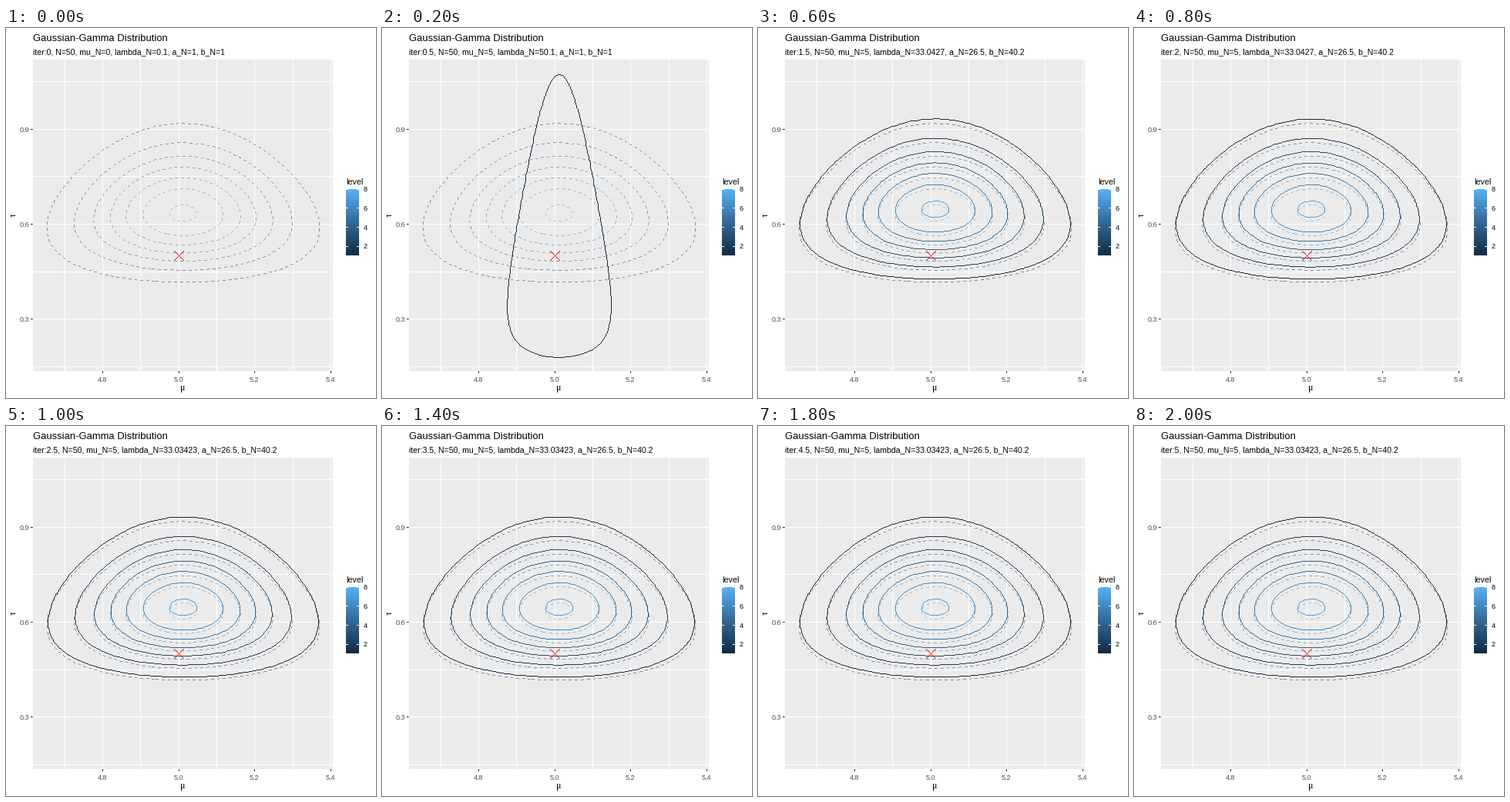
Animation of 480 by 480 pixels, one loop 2200 ms. Source, as a matplotlib script:

```python
import math
import numpy as np
import matplotlib.pyplot as plt
from matplotlib.animation import FuncAnimation

plt.rcParams["font.family"] = "Liberation Sans"
SIZE, DPI = 480, 100
PX = 72 / DPI
LEFT, TOP, RIGHT, BOTTOM = 35, 41, 424, 445
GREY, TICK = "#4D4D4D", (51, 51, 51)
WHITE, RED = (255, 255, 255), (255, 0, 0)
MIN_LEVEL, MAX_LEVEL = 1, 8

# model constants
N, LAMBDA0, A0, B0 = 50, 0.1, 1.0, 1.0
MU_N, A_N, B_BASE = 5.012, 26.5, 40.159863


def px_x(mu):
    return 224.1 + 493.5 * (mu - 5)


def px_y(tau):
    return 254.55 - 410.8 * (tau - 0.6)


def blue_scale(t):
    """Perceptual blend from dark to light blue, as 0-255 RGB."""
    to_xyz = np.array([[0.4124, 0.3576, 0.1805],
                       [0.2126, 0.7152, 0.0722],
                       [0.0193, 0.1192, 0.9505]])

    def encode(hex_color):
        c = np.array([int(hex_color[i:i + 2], 16) for i in (1, 3, 5)]) / 255
        return np.cbrt(to_xyz @ ((c + 0.055) / 1.055) ** 2.4)

    low, high = encode("#132B43"), encode("#56B1F7")
    rgb = np.linalg.solve(to_xyz, (low + (high - low) * t) ** 3)
    rgb = 1.055 * np.clip(rgb, 0, 1) ** (1 / 2.4) - 0.055
    return np.round(255 * np.clip(rgb, 0, 1))


def normal_gamma(mu, tau, m, lam, a, b):
    log_p = (0.5 * np.log(lam * tau / (2 * math.pi))
             - 0.5 * lam * tau * (mu - m) ** 2
             + a * math.log(b) - math.lgamma(a)
             + (a - 1) * np.log(tau) - b * tau)
    return np.exp(log_p)


def variational_steps(count):
    """Half-iterations: update q(mu), then q(tau), and so on."""
    m, lam, a, b = 0.0, LAMBDA0, A0, B0
    steps = [(m, lam, a, b)]
    for i in range(1, count):
        if i % 2:
            m, lam = MU_N, (LAMBDA0 + N) * a / b
        else:
            a, b = A_N, B_BASE + 1 / lam
        steps.append((m, lam, a, b))
    return steps


fig = plt.figure(figsize=(SIZE / DPI, SIZE / DPI), dpi=DPI, facecolor="white")
ax = fig.add_axes([0, 0, 1, 1])
ax.axis("off")


def stroke(img, points, color, alpha=1.0, dash=None):
    """Crisp one-pixel polyline, optionally dashed and translucent."""
    ends = np.floor(points).astype(int)
    runs = []
    for p, q in zip(ends[:-1], ends[1:]):
        n = max(abs(q - p).max(), 1)
        runs.append(np.round(np.linspace(p, q, n + 1)).astype(int)[:-1])
    path = np.vstack(runs + [ends[-1:]])
    if dash:
        gaps = np.hypot(*np.diff(path, axis=0).T)
        along = np.concatenate([[0], np.cumsum(gaps)])
        path = path[along % (2 * dash) < dash]
    cols, rows = path.T
    img[rows, cols] = (1 - alpha) * img[rows, cols] + alpha * np.asarray(color)


def draw_contours(img, density, **kw):
    levels = [v for v in range(MIN_LEVEL, MAX_LEVEL + 1) if v < density.max()]
    if not levels:
        return
    curves = ax.contour(GX, GY, density, levels=levels)
    for level, segments in zip(levels, curves.allsegs):
        color = blue_scale((level - MIN_LEVEL) / (MAX_LEVEL - MIN_LEVEL))
        for points in segments:
            stroke(img, points, color, **kw)
    curves.remove()


def label(x, y, text, size, color="black", **kw):
    return ax.text(x, y, text, fontsize=size * PX, color=color, **kw)


def draw_panel(img):
    img[TOP:BOTTOM, LEFT:RIGHT] = 235
    for mu in np.arange(4.7, 5.41, 0.1):
        stroke(img, [(px_x(mu), TOP), (px_x(mu), BOTTOM - 1)], WHITE)
    for tau in np.arange(0.15, 1.06, 0.15):
        stroke(img, [(LEFT, px_y(tau)), (RIGHT - 1, px_y(tau))], WHITE)
    for mu in (4.8, 5.0, 5.2, 5.4):
        x = px_x(mu)
        stroke(img, [(x, BOTTOM), (x, BOTTOM + 2)], TICK)
        label(x - 0.4, 459, f"{mu:.1f}", 9, GREY, ha="center")
    for tau in (0.3, 0.6, 0.9):
        y = px_y(tau)
        stroke(img, [(LEFT - 3, y), (LEFT - 1, y)], TICK)
        label(30.5, y + 3.4, f"{tau:.1f}", 9, GREY, ha="right")
    label(229.5, 470, "μ", 12, ha="center", family="Liberation Serif")
    label(10, 243, "τ", 12, ha="center", va="center", rotation=90,
          family="Liberation Serif")
    label(35, 17, "Gaussian-Gamma Distribution", 13)


def draw_legend(img):
    left, right, top, bottom = 441, 458, 209, 295
    label(left, 203, "level", 10.8)
    for y, t in zip(range(top, bottom), np.linspace(1, 0, bottom - top)):
        img[y, left:right] = blue_scale(t)
    for level in (2, 4, 6, 8):
        y = top + 0.3 + (MAX_LEVEL - level) * 12.3
        stroke(img, [(left, y), (left + 2, y)], WHITE)
        stroke(img, [(right - 3, y), (right - 1, y)], WHITE)
        label(464, y + 3.2, str(level), 9)


def draw_cross(img, arm=6):
    x, y = px_x(5.0), px_y(0.5)
    for side in (-1, 1):
        stroke(img, [(x - arm, y - side * arm), (x + arm, y + side * arm)], RED)


MU, TAU = np.meshgrid(np.arange(4.6, 5.441, 0.01), np.arange(0.1, 1.161, 0.01))
GX, GY = px_x(MU), px_y(TAU)

backdrop = np.full((SIZE, SIZE, 3), 255.0)
draw_panel(backdrop)
draw_legend(backdrop)
draw_contours(backdrop,
              normal_gamma(MU, TAU, MU_N, LAMBDA0 + N, A0 + N / 2, B_BASE),
              alpha=0.5, dash=4)

steps = variational_steps(11)
scenes = []
for m, lam, a, b in steps:
    scene = backdrop.copy()
    draw_contours(scene, normal_gamma(MU, TAU, m, lam * b / a, a, b))
    draw_cross(scene)
    scenes.append(scene.astype(np.uint8))

picture = ax.imshow(scenes[0], extent=(0, SIZE, SIZE, 0), aspect="auto",
                    interpolation="nearest", zorder=0)
subtitle = label(34.7, 34, "", 10.5)
ax.set_xlim(0, SIZE)
ax.set_ylim(SIZE, 0)


def update(frame):
    m, lam, a, b = steps[frame]
    subtitle.set_text(
        f"iter:{frame / 2:g}, N={N}, mu_N={round(m, 1):g}, "
        f"lambda_N={round(lam, 5):.7g}, a_N={a:g}, b_N={round(b, 1):g}")
    picture.set_data(scenes[frame])
    return [picture, subtitle]


anim = FuncAnimation(fig, update, frames=len(steps), interval=200,
                     init_func=lambda: update(0), repeat=True, repeat_delay=0)
plt.show()
```
